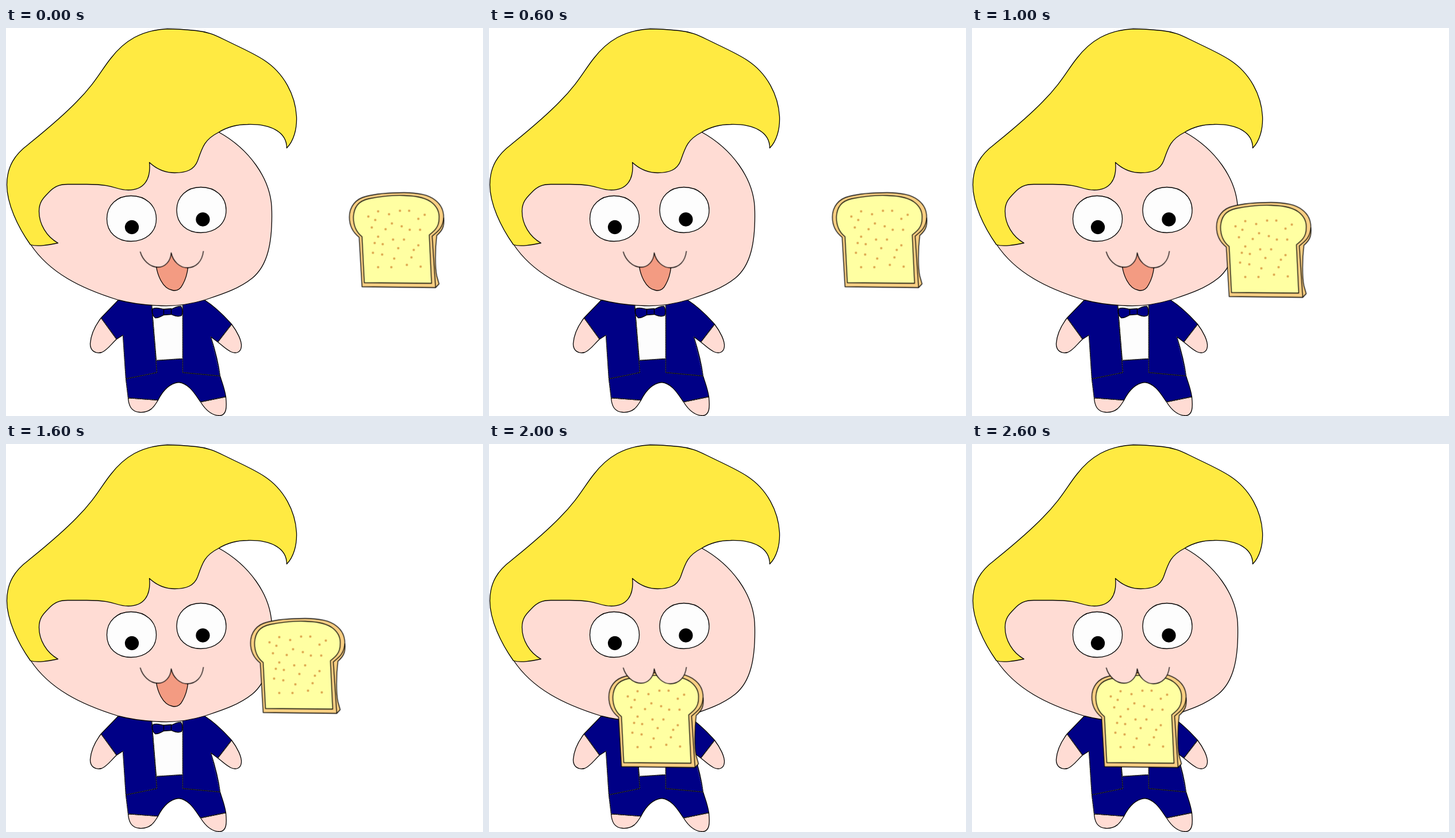
Recreate the animation shown at these times as an HTML page. Size 830 by 674 pixels, loop 3 s.

```html
<!DOCTYPE html>
<html lang="en">
<head>
<meta charset="utf-8">
<title>Toast time</title>
<style>
  html, body { margin: 0; width: 100%; height: 100%; overflow: hidden; background: #fff; }
  svg { display: block; width: 830px; height: 674px; }
  .art { stroke: #000; stroke-width: 1.3; stroke-linejoin: round; fill: none; }
  .skin { fill: #ffdcd4; }
  .hair { fill: #ffea42; }
  .navy { fill: #000086; }
  .white { fill: #fdfdfd; }
  .mouth { fill: #f39b82; }
  .crust { fill: #f9cf83; }
  .crumb { fill: #ffffa2; }
  .pupil { fill: #000; }
  .seam { stroke: #8c8c9c; stroke-width: 1; stroke-dasharray: 1 2; }
  .dots { stroke: #dca24a; stroke-width: 4; stroke-linecap: round; }
  #bread { animation: eat 3s step-end infinite; }
  @keyframes eat {
    0% { transform: translate(0, 0); }
    33.3333% { transform: translate(-172px, 17px); }
    66.6667%, 100% { transform: translate(-389px, 111px); }
  }
</style>
</head>
<body>
<svg viewBox="0 0 830 674">
  <g class="art" transform="translate(.5 .5)">
    <g id="body">
      <path class="skin" d="M165 503C155 516 147 533 146 548C146 560 155 566 166 563C175 560 183 548 192 540Z"/>
      <path class="skin" d="M392 514C402 527 410 543 409 553C408 563 400 566 391 562C381 557 376 551 368 545Z"/>
      <path class="skin" d="M212 642C213 655 217 666 232 667C250 668 257 658 264 646Z"/>
      <path class="skin" d="M338 649C346 662 357 673 372 673C383 671 384 660 382 640Z"/>
      <path class="navy" d="M195 472L165 503L192 540L203 533L208 609L212 642L264 646C272 630 283 617 300 615C318 617 328 635 338 649L382 640C380 626 375 614 372 604C369 580 362 555 356 536L368 545L392 514C377 497 362 483 345 472Z"/>
      <path class="white" d="M253 480H307V574L261 577Z"/>
      <path d="M253 482L262 598L208 609M307 481V598L372 604"/>
      <path class="seam" d="M253 482L262 598L208 609M307 481V598L372 604M261 577L307 574M203 533L208 609L212 642L264 646M338 649L382 640M165 503L192 540M368 545L392 514M356 536L372 604"/>
      <path class="navy" d="M255 487C262 484 267 487 274 488V498C268 501 264 504 259 503C254 499 253 492 255 487Z"/>
      <path class="navy" d="M287 488C293 485 300 482 304 483C307 488 307 495 305 499C298 502 293 499 287 497Z"/>
      <path class="navy" d="M274 488L287 487V497L274 498Z"/>
    </g>
    <g id="head">
      <path class="skin" d="M369 180C420 208 462 260 462 318C463 372 455 412 428 434C403 454 372 463 345 472C318 480 295 483 270 482C243 481 218 478 195 472C130 452 75 425 42 375L30 300L100 220Z"/>
      <path class="hair" d="M42 376C55 380 75 376 90 373C70 362 57 340 57 318C57 303 63 296 73 286C83 275 92 271 107 271H140C190 271 190 281 212 281C240 281 252 262 249 233C262 245 277 251 293 251C313 251 327 246 333 230C341 207 345 193 369 181C385 171 402 167 420 167C460 166 488 180 488 208C500 196 506 175 505 153C503 117 484 78 448 55C430 43 400 30 380 20C362 11 350 6 330 4C310 2 290 1 280 1C235 3 205 22 182 52C165 73 155 95 123 127C95 156 65 180 38 202C15 219 1 240 1 272C1 305 20 345 42 376Z"/>
      <path id="eye" class="white" d="M175 331C175 307 193 291 217 291C242 291 261 307 261 331C261 355 242 370 217 370C193 370 175 355 175 331Z"/>
      <use href="#eye" x="121.500" y="-15"/>
      <circle class="pupil" cx="218.500" cy="345.500" r="11.500"/>
      <circle class="pupil" cx="342" cy="332" r="11.500"/>
      <path class="mouth" d="M287 390L261 414C263 427 271 452 289 455C297 457 303 453 307 445C312 436 315 425 316 416Z"/>
    </g>
    <g id="bread">
      <path class="crust" d="M619 449L614 363C605 356 597 344 597 328C597 310 608 296 626 292C645 287 668 285.500 692 285.500C717 286 735 289 747 299C757 307 761 318 761 328C763 345 758 352 749 360C746 385 746 415 749 430L753 444L747 450.500Z"/>
      <path d="M761 329C760 346 752 352 741 361L747 450"/>
      <path class="crumb" d="M623 442L619 362C610 355 604 345 604 328C605 310 613 300 631 296C650 292 675 290 692 290.500C715 291 732 295 742 304C750 311 754 320 753 331C753 345 745 352 736 359L740 443Z"/>
      <path class="dots" d="M647 318h0M666 323h0M685 317h0M701 317h0M728 324h0M630 327h0M642 333h0M717 331h0M636 346h0M660 349h0M671 339h0M688 344h0M702 350h0M720 350h0M647 362h0M673 367h0M692 367h0M641 373h0M655 375h0M717 377h0M682 382h0M709 385h0M638 390h0M654 393h0M705 398h0M675 400h0M647 415h0M670 415h0M697 411h0M721 414h0"/>
    </g>
    <!-- upper lip stays in front of the bread -->
    <path class="skin" d="M233 388C237 402 249 415 264 415C276 415 286 405 287 390C290 405 302 416 315 416C330 416 341 405 343 387"/>
  </g>
</svg>
</body>
</html>
```
